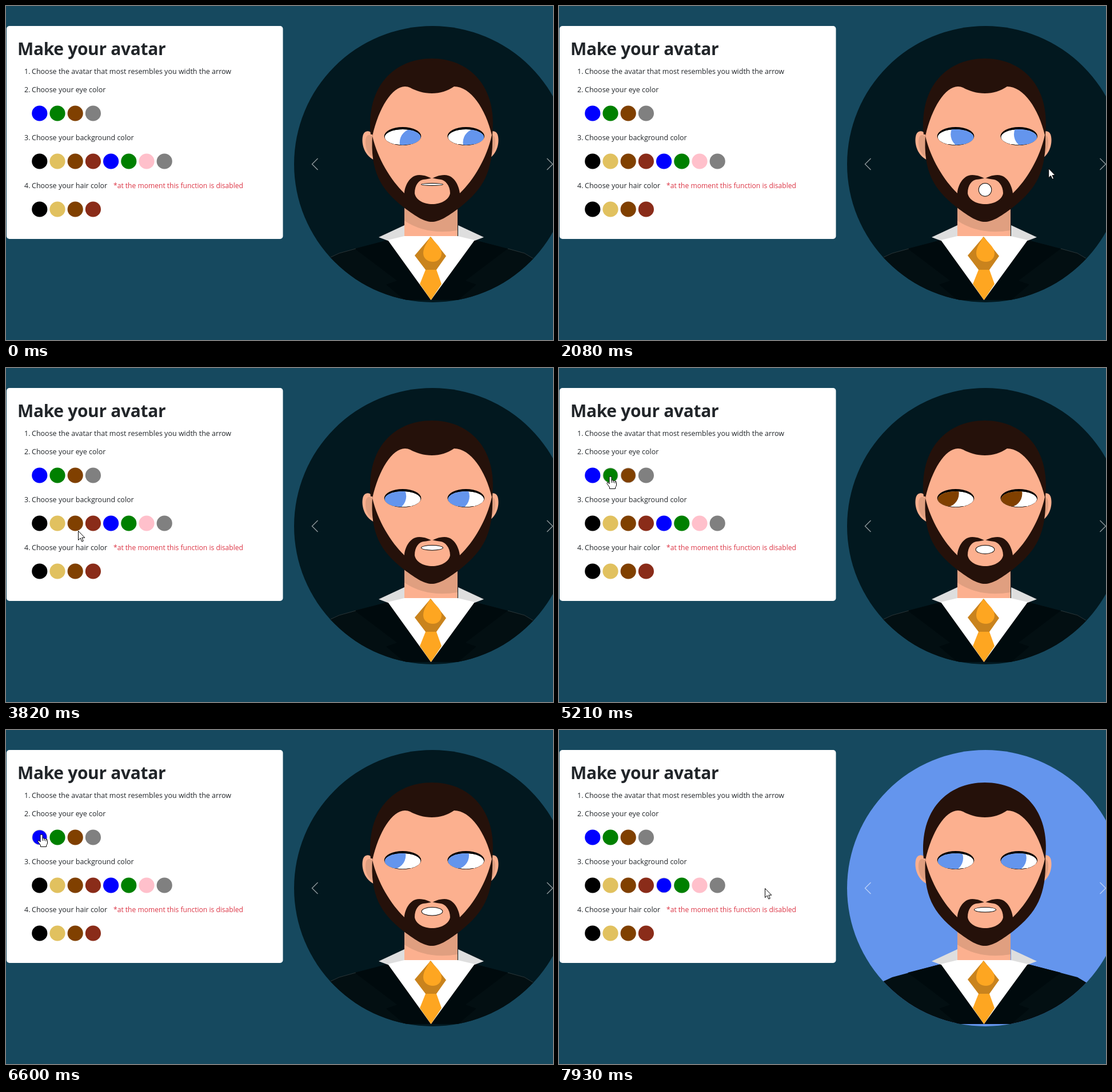
Write an HTML page with a canvas that moves like this. It is 957 px wide and 585 px high and loops after 8 s.

```html
<!DOCTYPE html>
<html lang="en">
<head>
<meta charset="utf-8">
<title>Make your avatar</title>
<style>
  html, body { margin: 0; width: 100%; height: 100%; overflow: hidden; background: #16495f; }
  canvas, svg { position: absolute; left: 0; top: 0; width: 957px; height: 585px; }
  text { font: 12.5px "Open Sans", "Noto Sans", sans-serif; fill: #212529; }
  .title { font-size: 30px; font-weight: 700; letter-spacing: -.35px; }
  .note { font-size: 12.1px; fill: #dc3545; }
</style>
</head>
<body>
<canvas id="stage" width="957" height="585"></canvas>
<svg viewBox="0 0 957 585">
  <text class="title" x="20" y="86">Make your avatar</text>
  <text x="32" y="119">1.</text>
  <text x="45" y="119">Choose the avatar that most resembles you width the arrow</text>
  <text x="32" y="151">2.</text>
  <text x="45" y="151">Choose your eye color</text>
  <text x="32" y="235">3.</text>
  <text x="45" y="235">Choose your background color</text>
  <text x="32" y="319">4.</text>
  <text x="45" y="319">Choose your hair color</text>
  <text class="note" x="188" y="319">*at the moment this function is disabled</text>
  <g id="cursor" fill="#fff" stroke="#000" stroke-linejoin="round">
    <path id="arrow" d="M.5 .5V16.5L4.2 13L6.8 19L9.3 18L6.8 12.2H11.8Z"/>
    <g id="hand">
      <path d="M-2 1.5Q-2 0 0 0Q2 0 2 1.5V7Q4 5.5 5 7.5Q7 6.5 8 8.5Q10.5 8 10.5 10.5V15Q10 18 8.5 19V21.5H-1.5V19L-6 12.5Q-6.5 10 -4 10.5L-2 13Z"/>
      <path d="M2 7V11M5 8V11M8 9V12" fill="none"/>
    </g>
  </g>
</svg>
<script>
const LOOP = 8000, TALK = 4100;
const ctx = document.getElementById('stage').getContext('2d');
const [cursor, arrow, hand] = ['cursor', 'arrow', 'hand'].map(id => document.getElementById(id));

const SKIN = '#fcb08f', SHADE = '#e09f80', HAIR = '#25110a';
const SKY = '#6495ed', NIGHT = '#02181f', BLUE = '#00f';
const BROWN = '#804000', GREEN = '#008000', GRAY = '#808080';
const HAIR_COLORS = ['#000', '#e1c15f', BROWN, '#8a2c19'];

const swatchRow = (y, colors) => colors.map((color, i) => ({ x: 58.8 + 31.2 * i, y, color }));
const eyeRow = swatchRow(188, [BLUE, GREEN, BROWN, GRAY]);
const backRow = swatchRow(272, [...HAIR_COLORS, BLUE, GREEN, '#ffc0cb', GRAY]);
const swatches = [...eyeRow, ...backRow, ...swatchRow(356, HAIR_COLORS)];

const CLICKS = [
  { at: 4500, swatch: eyeRow[2], iris: BROWN },
  { at: 5500, swatch: eyeRow[1], iris: GREEN },
  { at: 6400, swatch: eyeRow[0], iris: SKY },
  { at: 7650, swatch: backRow[4], back: SKY }
];

// Pointer stops: arrival time, x, y, time spent there
const STOPS = [
  [0, 1050, 800, 0], [800, 778, 578, 0], [1240, 615, 212, 0], [1660, 890, 285, 350],
  [2600, 45, 268, 0], [2840, 361, 256, 0], [3450, 525, 535, 0], [3820, 126, 285, 0],
  [4200, 120, 187, 650], [5000, 90, 190, 850], [6200, 62, 183, 490],
  [7400, 184, 272, 270], [7930, 360, 277, 70]
];

const smooth = f => f * f * (3 - 2 * f);
const bump = (t, mid, spread) => Math.exp(-(((t - mid) / spread) ** 4));

function pointerAt(t) {
  const i = STOPS.findLastIndex(s => s[0] <= t);
  const [at, x, y, stay] = STOPS[i];
  const next = STOPS[i + 1];
  if (!next || t < at + stay) return [x, y];
  const f = smooth((t - at - stay) / (next[0] - at - stay));
  return [x + (next[1] - x) * f, y + (next[2] - y) * f];
}

function shape(d, fill) {
  ctx.fillStyle = fill;
  ctx.fill(new Path2D(d));
}

// Draws a shape and its reflection about a vertical axis
function pair(d, fill, axis) {
  shape(d, fill);
  ctx.save();
  ctx.translate(2 * axis, 0);
  ctx.scale(-1, 1);
  shape(d, fill);
  ctx.restore();
}

function oval(x, y, rx, ry, fill) {
  ctx.beginPath();
  ctx.ellipse(x, y, rx, ry, 0, 0, Math.PI * 2);
  ctx.fillStyle = fill;
  ctx.fill();
}

function line(d, color, width) {
  ctx.strokeStyle = color;
  ctx.lineWidth = width;
  ctx.stroke(new Path2D(d));
}

function drawCard(ringed) {
  ctx.beginPath();
  ctx.roundRect(1, 35, 483.5, 373, 5);
  ctx.fillStyle = '#fff';
  ctx.fill();
  for (const s of swatches) {
    if (ringed.includes(s)) {
      oval(s.x, s.y, 13.6, 13.6, '#d0d0d0');
      oval(s.x, s.y, 12.6, 12.6, s.color);
    } else {
      oval(s.x, s.y, 13.6, 13.6, s.color);
    }
  }
}

function drawSuit(dark) {
  shape('M540 452L568 440L583 433L668 410H820L907 433L922 442L950 455V515H540Z', '#030f12');
  pair('M610 425L668 410L743 515H697L665 488L684 481Z', '#000a0d', 744);
  if (dark) line('M568 440L583 433L612 425M878 425L907 433L922 442', 'rgba(190,180,175,.3)', .7);
  shape('M697 345H790V404H697Z', SKIN);
  shape('M697 345H790V393Q736 402 697 376Z', SHADE);
  pair('M652 405L697 384V404L668 411Z', '#dedede', 744);
  shape('M668 410L697 403H790L820 410L743.5 515Z', '#fff');
  shape('M743 404L770 438L753 462H734L715 437Z', '#c9831d');
  shape('M742 404C749 413 762 422 762 433C762 442 755 448 747 448C738 448 730 442 730 433C730 422 738 413 742 404Z', '#fea621');
  shape('M734 462H753L762 487L743.5 515L724 487Z', '#fea621');
}

function drawHead() {
  pair('M642 224C635 217 628 218 625 225C621 236 624 261 645 270Z', SKIN, 742.5);
  pair('M640 228C634 223 630 227 629 235C628 250 634 261 642 264Z', SHADE, 742.5);
  // Hair and beard, then the face and the chin on top
  shape('M638 225C630 140 680 92 745 92C810 92 860 140 851 225C853 290 835 320 795 352C770 371 757 378 745 378C733 378 720 371 695 352C655 320 637 290 641 225Z', HAIR);
  shape('M641 228C652 178 676 141 698 141Q703 141 707 143C718 149 731 153 745 153C760 153 772 149 784 141C813 141 839 180 850 226C841 267 818 305 794 328C793 318 786 296 767 296C757 296 750 300 745 302C740 300 733 296 723 296C705 296 697 318 697 328C673 305 650 267 641 228Z', SKIN);
  shape('M715 328C715 313 723 305 730 304Q740 303 745 301Q752 303 761 304C768 305 777 314 777 328C775 340 760 347 746 347C731 347 717 340 715 328Z', SKIN);
}

function drawEye(x, dx, dy, color) {
  oval(x, 228, 32.3, 16, '#000');
  ctx.save();
  ctx.beginPath();
  ctx.ellipse(x, 229.7, 31.5, 13.7, 0, 0, Math.PI * 2);
  ctx.clip();
  ctx.fillStyle = '#fff';
  ctx.fill();
  oval(x + dx, 228 + dy, 24, 24, color);
  ctx.restore();
}

function drawMouth(t) {
  const open = bump(t, 1800, 800);
  const w = 39 - 16 * open ** 2 + 20 * bump(t, 2900, 350);
  const h = 5 + 19 * open + 6 * bump(t, 3400, 600);
  oval(745.5, 310 + h / 2, w / 2, h / 2, '#000');
  oval(745.5, 310 + h / 2, w / 2 - 1, h / 2 - 1, '#fff');
}

function drawAvatar(t, x, y, iris, back) {
  ctx.save();
  ctx.beginPath();
  ctx.arc(746, 277, 242, 0, Math.PI * 2);
  ctx.clip();
  ctx.fillStyle = back;
  ctx.fillRect(500, 30, 460, 500);
  drawSuit(back === NIGHT);
  ctx.restore();
  drawHead();
  // The eyes follow the pointer
  const dx = 20.5 * Math.tanh((x - 550) / 320);
  const dy = 11 * Math.tanh((y - 330) / 150);
  drawEye(694, dx, dy, iris);
  drawEye(804.7, dx, dy, iris);
  drawMouth(t % TALK);
  line('M545.5 267L535.5 277L545.5 287M946.5 267L956.5 277L946.5 287', 'rgba(255,255,255,.55)', 1.4);
}

function render(t) {
  const [x, y] = pointerAt(t);
  const hovered = swatches.find(s => Math.hypot(s.x - x, s.y - y) < 13.5);
  const done = CLICKS.filter(c => c.at <= t);
  const { iris, back, swatch } = Object.assign({ iris: SKY, back: NIGHT }, ...done);
  ctx.fillStyle = '#16495f';
  ctx.fillRect(0, 0, 957, 585);
  drawCard([hovered, swatch]);
  drawAvatar(t, x, y, iris, back);
  cursor.setAttribute('transform', `translate(${x} ${y})`);
  arrow.style.display = hovered ? 'none' : '';
  hand.style.display = hovered ? '' : 'none';
}

const start = performance.now();
function loop() {
  render((performance.now() - start) % LOOP);
  requestAnimationFrame(loop);
}
loop();
</script>
</body>
</html>
```
